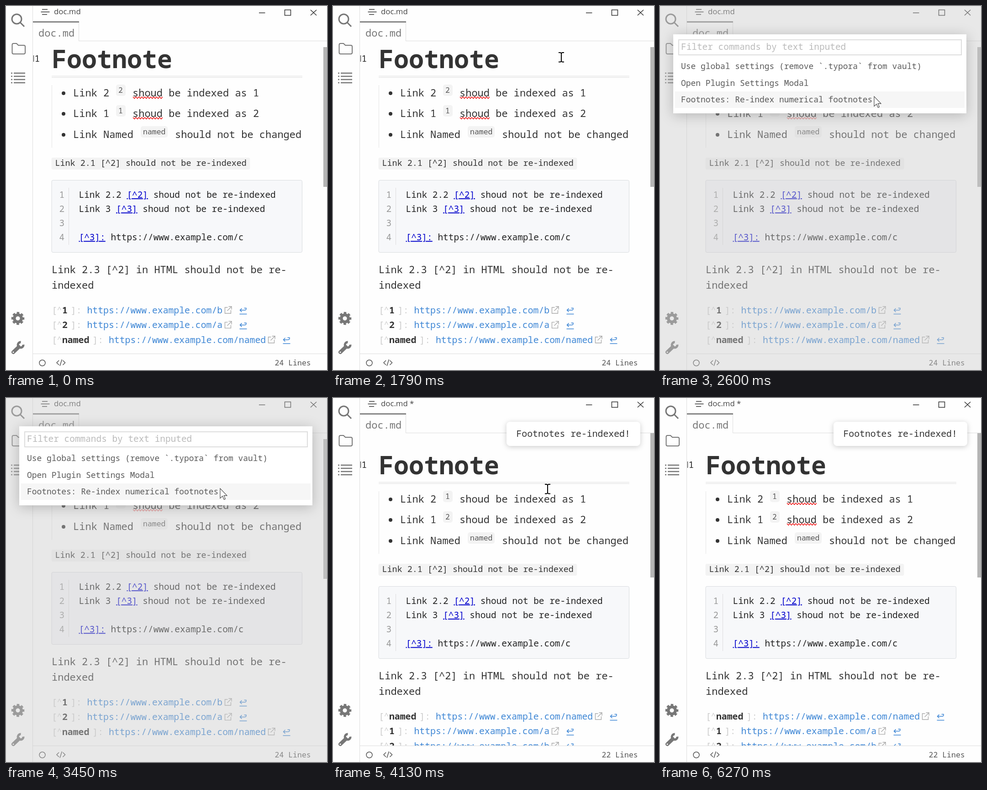
Animation of 703x797 px, one loop 6740 ms. Source, as an HTML page:

```html
<!DOCTYPE html>
<html lang="en">
<head>
<meta charset="utf-8">
<title>Footnote re-indexing</title>
<style>
  html, body { margin: 0; width: 100%; height: 100%; overflow: hidden; background: #fefefe; }
  svg { display: block; width: 100vw; height: 100vh; }
  text { font-family: "Noto Sans Mono", monospace; fill: #333; white-space: pre; }
  .title { font: 16.8px "Open Sans", sans-serif; fill: #444; }
  .body { font-size: 22px; }
  .code { font-size: 19.43px; fill: #222; }
  .sup { font-size: 16.5px; fill: #555; }
  .note { font-size: 19.8px; }
  .item { font-size: 17.93px; fill: #5a5a5a; }
  .faint { fill: #ccc; }
  .url { fill: #3f87d5; }
  .link { fill: #00c; text-decoration: underline; text-decoration-thickness: 1.2px; }
  .line { fill: none; stroke: #ddd; }
  .icon { fill: none; stroke: #777; }
  .window { fill: none; stroke: #333; stroke-width: 1.5; }
  .panel { fill: #fff; filter: drop-shadow(0 2px 6px rgba(0, 0, 0, .2)); }
  #palette .panel { filter: drop-shadow(0 4px 14px rgba(0, 0, 0, .22)); }
</style>
</head>
<body>
<svg viewBox="0 0 703 797">
  <defs>
    <clipPath id="page"><rect x="59" y="77" width="644" height="684"/></clipPath>
  </defs>
  <rect width="703" height="797" fill="#fefefe"/>

  <g clip-path="url(#page)">
    <g id="before"></g>
    <g id="after"></g>
  </g>
  <rect id="scrollbar" x="695" width="8" fill="#b5b5b5"/>

  <!-- sidebar -->
  <path class="line" d="M58.5 0V797M59 761.5H703"/>
  <g class="icon" stroke-width="3">
    <circle cx="23.5" cy="28.5" r="10.5"/>
    <path d="M31 36L40 45"/>
    <path stroke-width="2" stroke-linejoin="round"
      d="M13.5 102V85Q13.5 82 16.5 82H23L27 86H39Q42 86 42 89V102Q42 105 39 105H16.5Q13.5 105 13.5 102Z"/>
    <path stroke-width="2.6" d="M11 147h3m3 0h25M11 154h3m3 0h25M11 161h3m3 0h25M11 168h3m3 0h25"/>
    <circle cx="26" cy="684" r="7.8" stroke-width="6.5"/>
    <circle cx="26" cy="684" r="12" stroke-width="4.5" stroke-dasharray="5.4 4.025" stroke-dashoffset="2.7"/>
    <path stroke-width="8" stroke-linecap="round" d="M16 758L28 746.5"/>
    <path stroke-width="5" d="M38 741.5A6 6 0 1 1 32.5 736"/>
  </g>
  <circle cx="16" cy="758" r="1.6" fill="#fefefe"/>

  <!-- title bar, tab and status bar -->
  <path class="window" d="M79 7.5H91M76.5 13H95.5M79 18.5H90"/>
  <text class="title" x="105" y="18">doc.md</text>
  <text class="title" id="modified" x="168" y="18">*</text>
  <path class="window" d="M554 15H567.5M610.5 8.5H623.5V20.5H610.5ZM667 8.5L680 20.5M680 8.5L667 20.5"/>
  <path class="line" d="M159.5 36V76.5H703"/>
  <rect x="59" y="33.5" width="101" height="2.7" fill="#777"/>
  <text class="body" x="71" y="67" style="fill:#777">doc.md</text>
  <g class="icon" style="stroke:#555" stroke-width="1.5">
    <circle cx="79.5" cy="781.5" r="6.5"/>
    <path d="M116 776L111 781L116 786M124.5 776L129.5 781L124.5 786M122.5 774L118 788"/>
  </g>
  <text class="sup" id="lines" x="588.5" y="787"></text>

  <g id="toast">
    <rect class="panel" x="380" y="52" width="293" height="53" rx="8"/>
    <text class="note" x="401.5" y="85">Footnotes re-indexed!</text>
  </g>

  <g id="palette">
    <rect width="703" height="797" fill="#cacaca" opacity=".43"/>
    <rect class="panel" x="29" y="62" width="642" height="173"/>
    <rect class="line" x="41" y="74" width="619" height="33" stroke-width="2"/>
    <text class="code" x="46" y="96" style="fill:#bbb">Filter commands by text inputed</text>
    <rect id="hover" x="33" y="187" width="634" height="36" fill="#f6f6f6"/>
    <text class="item" x="46" y="138">Use global settings (remove `.typora` from vault)</text>
    <text class="item" x="46" y="174.5">Open Plugin Settings Modal</text>
    <text class="item" x="46" y="211">Footnotes: Re-index numerical footnotes</text>
    <path id="filterCaret" d="M47 78V102" stroke="#000" stroke-width="1.5"/>
  </g>

  <path id="beam" d="M-6 -10H-2L0 -8.5L2 -10H6M0 -9V10M-6 10.5H-2L0 9L2 10.5H6"
    fill="none" stroke="#000" stroke-width="2"/>
  <path id="arrow" d="M0 0V21.5L5.2 16.7L8.5 24.2L11.4 23L8.2 15.6H15Z"
    fill="#fff" stroke="#444" stroke-width="1.1"/>
</svg>

<script>
const LOOP = 6740, PALETTE_OPEN = 1990, REINDEXED = 3580;
const $ = id => document.getElementById(id);
const show = (id, on) => $(id).style.display = on ? '' : 'none';
const text = (kind, x, y, content) => `<text class="${kind}" x="${x}" y="${y}">${content}</text>`;
const link = s => `<tspan class="link">${s}</tspan>`;

const badge = (x, y, width, label) =>
  `<rect x="${x}" y="${y}" width="${width}" height="25" rx="5" fill="#f3f3f3"/>` +
  text('sup', x + 5, y + 17.5, label);

function listItem(baseline, label, ref) {
  const named = ref === 'named';
  return `<circle cx="126" cy="${baseline - 7}" r="4" fill="#333"/>` +
    text('body', 147, baseline, label) +
    (named ? badge(295, baseline - 26, 59, ref) : badge(241, baseline - 26, 21, ref)) +
    text('body', named ? 370 : 277, baseline,
      named ? 'should not be changed' : `shoud be indexed as ${label.endsWith('2') ? 1 : 2}`);
}

const squiggle = y => `<path d="M278 ${y}${'l3.25 3.5l3.25 -3.5'.repeat(10)}" fill="none" stroke="#e00" stroke-width="1.2"/>`;

function codeLines(x, mark) {
  return [
    `Link 2.2 ${mark('[^2]')} shoud not be re-indexed`,
    `Link 3 ${mark('[^3]')} shoud not be re-indexed`,
    '',
    `${mark('[^3]:')} https://www.example.com/c`
  ].map((line, i) => text('code', x, 420 + 31.1 * i, line)).join('');
}

function footnote([label, page], row) {
  const advance = 11.88, y = 673 + 32.4 * row;
  const tail = 123 + label.length * advance;
  const url = `https://www.example.com/${page}`;
  const urlX = tail + 42.6, end = urlX + url.length * advance;
  return text('note faint', 100, y, '[') + text('sup faint', 112, y - 3, '^') +
    `<text class="note" x="123" y="${y}" font-weight="700">${label}</text>` +
    text('note faint', tail + 7, y, ']:') + text('note url', urlX, y, url) +
    `<g fill="none" transform="translate(${end} ${y})">
      <path d="M11 -13H5V0H18V-7M13 -15H19.5V-8.5M19 -14.5L10 -5.5" stroke="#aaa" stroke-width="1.4"/>
      <path d="M42 -11L38 -7L42 -3M38 -7H48Q51.5 -7 51.5 -10V-11.5H47M37 1.5H53" stroke="#3f87d5" stroke-width="1.5"/>
    </g>`;
}

function buildDocument(id, refs, notes) {
  $(id).innerHTML = `
    <path d="M60.5 108V122" stroke="#555" stroke-width="1.5"/>
    ${text('code', 62.5, 122, '1')}
    <text x="100" y="136" font-size="55" font-weight="700">Footnote</text>
    <path class="line" d="M100 153.5H649M100 156.5H649"/>
    <path class="line" stroke-dasharray="1.5 1.5" style="stroke:#ccc" d="M100.5 174V310"/>
    ${listItem(198, 'Link 2', refs[0])}
    ${listItem(243, 'Link 1', refs[1])}
    ${listItem(289, 'Link Named', 'named')}
    <g class="spelling">${squiggle(199)}${squiggle(244)}</g>
    <rect x="99.5" y="332" width="435" height="26" rx="4" fill="#f3f3f3"/>
    <text x="107.5" y="350" font-size="18.4">Link 2.1 [^2] should not be re-indexed</text>
    <rect x="100" y="381.5" width="548.5" height="158" rx="3" fill="#f7f8fa" stroke="#d9dcdf"/>
    <g class="plain">${codeLines(111.5, s => s)}</g>
    <g class="rich">
      <path class="line" d="M137.5 398V523"/>
      ${[1, 2, 3, 4].map(n => `<text x="116.5" y="${420 + 31.1 * (n - 1)}" font-size="19.4" style="fill:#999">${n}</text>`).join('')}
      ${codeLines(159.5, link)}
    </g>
    ${text('body', 100, 585, 'Link 2.3 [^2] in HTML should not be re-')}
    ${text('body', 100, 619, 'indexed')}
    ${notes.map(footnote).join('')}
    <path class="caret" stroke="#000" stroke-width="1.5"/>`;
}

buildDocument('before', [2, 1], [['1', 'b'], ['2', 'a'], ['named', 'named']]);
buildDocument('after', [1, 2], [['named', 'named'], ['1', 'a'], ['2', 'b']]);
$('after').setAttribute('transform', 'translate(0 31)');
document.querySelector('#before .caret').setAttribute('d', 'M363 87V151');
document.querySelector('#after .caret').setAttribute('d', 'M100 87V151');

// Pointer stops: time, x, y, shape.
const pointer = [
  [0, 0, 0, ''],
  [710, 588, 297, 'beam'], [800, 575, 250, 'beam'], [900, 550, 190, 'beam'],
  [990, 525, 140, 'beam'], [1090, 505, 105, 'beam'], [1180, 497, 110, 'beam'],
  [1320, 500, 112, 'beam'],
  [1990, 499, 111, 'arrow'], [2190, 497, 119, 'arrow'], [2260, 493, 136, 'arrow'],
  [2330, 486, 158, 'arrow'], [2400, 477, 180, 'arrow'], [2470, 471, 193, 'arrow'],
  [2600, 469, 198, 'arrow'],
  [3580, 470, 199, 'beam'], [5200, 487, 195, 'beam'], [5270, 520, 185, 'beam'],
  [5340, 572, 167, 'beam'], [5400, 630, 143, 'beam'], [5470, 0, 0, '']
];

const within = (t, ...spans) => spans.some(([from, to]) => t >= from && t < to);

function render(t) {
  const after = t >= REINDEXED;
  const rich = !after || t >= 4130;
  const paletteOpen = within(t, [PALETTE_OPEN, REINDEXED]);
  show('before', !after);
  show('after', after);
  show('toast', after);
  show('modified', after);
  $('lines').textContent = `${after ? 22 : 24} Lines`;
  $('scrollbar').setAttribute('y', after ? 77 : 90);
  $('scrollbar').setAttribute('height', after ? 316 : 306);

  const parts = {
    plain: !rich,
    rich,
    spelling: !after || t >= 4590,
    caret: within(t, [1180, 1790], [3580, 4130], [4650, 5200], [5740, 6270])
  };
  for (const name in parts)
    for (const el of document.getElementsByClassName(name)) el.style.display = parts[name] ? '' : 'none';
  document.querySelector('#before .spelling').style.opacity = paletteOpen ? .5 : 1;

  const [, x, y, shape] = pointer.findLast(stop => stop[0] <= t);
  for (const id of ['beam', 'arrow']) {
    show(id, id === shape);
    $(id).setAttribute('transform', `translate(${x} ${y})`);
  }
  // The pointer is still fading in while the palette opens.
  $('arrow').style.opacity = t < 2190 ? .6 : 1;
  show('palette', paletteOpen);
  show('hover', y >= 187);
  show('filterCaret', within(t, [1990, 2530], [3060, 3320]));
}

const start = performance.now();
function tick() {
  render((performance.now() - start) % LOOP);
  requestAnimationFrame(tick);
}
tick();
</script>
</body>
</html>
```
